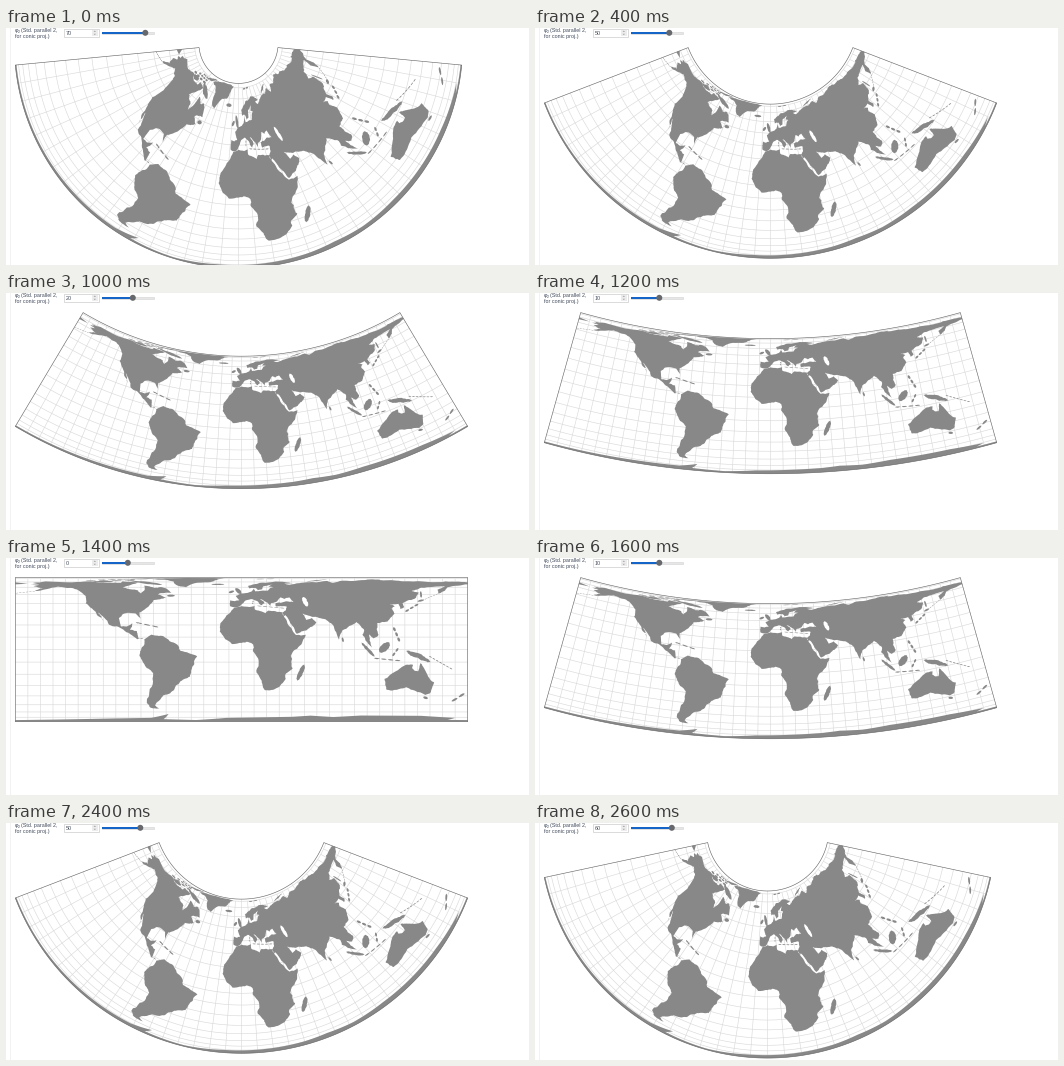
Write a matplotlib script that moves like this. It is 523x237 px and loops after 2800 ms.

```python
import matplotlib.pyplot as plt
import numpy as np
from matplotlib.animation import FuncAnimation
from matplotlib.collections import LineCollection, PolyCollection
from matplotlib.patches import Circle, Polygon, Rectangle

W, H, DPI = 523, 237, 100
PX = 72 / DPI
LAND, GRID, EDGE, TEXT = "#888888", "#d9d9d9", "#666666", "#434c5c"
rng = np.random.default_rng(4)

# Key capes and bays as (longitude, latitude); rough() adds the detail.
north_america = [
    (-168, 65.6), (-162, 66.4), (-166, 68.3), (-156, 71.3), (-128, 70),
    (-108, 68), (-96, 68), (-94.5, 71.5), (-82, 69), (-87, 65), (-94.5, 59),
    (-82.3, 55.2), (-80, 51.3), (-77, 56.5), (-77.5, 62.5), (-69.5, 59),
    (-64.5, 60.3), (-55.8, 52.2), (-66.5, 50), (-60, 46.2), (-70, 43.5),
    (-76, 35), (-81.3, 31), (-80.4, 25.3), (-84, 30), (-94.5, 29.5),
    (-97.6, 26), (-96, 18.9), (-91.5, 18.7), (-87, 21.5), (-88.8, 15.9),
    (-83.3, 15), (-82, 9), (-77.3, 8.5), (-83, 8.3), (-94, 16.1),
    (-105.5, 20.3), (-114, 31), (-109.6, 23.1), (-117.2, 32.8),
    (-124, 40), (-124, 48.2), (-134, 58.5), (-146, 61), (-164.5, 54.6),
    (-158, 58.3), (-165.5, 61.7), (-161, 64.2)]
south_america = [
    (-77.4, 8), (-71.8, 12), (-62, 10.6), (-51.5, 4.2), (-48.5, -1),
    (-35.3, -5.3), (-39, -13.5), (-41, -22), (-48.5, -26), (-54, -34.5),
    (-58, -38), (-62.3, -39.5), (-65.5, -45), (-68.8, -51), (-65.5, -54.8),
    (-72, -54), (-75.3, -48), (-73.5, -38), (-70.3, -19), (-76, -14),
    (-81.2, -5), (-80, -0.5), (-77.3, 4)]
africa = [
    (-6, 35.6), (10.5, 37.2), (10.5, 34), (19, 30.3), (21.5, 32.8),
    (32.4, 31.2), (37.2, 20), (43.3, 11.7), (51.2, 11.9), (47.5, 4),
    (39.2, -5), (40.7, -15), (35, -20), (35, -24.3), (30, -31.2),
    (25, -34), (18.5, -34.2), (14.6, -23), (11.8, -17), (13.6, -12),
    (9, -1), (9.3, 4), (4.3, 6.3), (-7.6, 4.4), (-13.2, 8.7), (-17.3, 14.7),
    (-16.8, 21.5), (-9.8, 30)]
europe = [
    (-9, 37), (-9, 43.2), (-1.6, 43.5), (-4.5, 48.3), (8, 53.7),
    (9.5, 57.5), (10.8, 54), (21, 55), (23, 59), (29.5, 60), (21.5, 61),
    (25, 65.2), (17.3, 61.5), (16.5, 57), (13, 55.5), (11, 59), (6, 58.3),
    (5, 62), (14.5, 68), (27, 71), (41, 67), (34, 66.4), (38, 64.2),
    (44, 67), (60, 69)]
north_asia = [
    (68, 72.5), (72.5, 68), (80.5, 73.2), (104, 77.5), (113, 74),
    (129, 71.5), (160, 69.7), (180, 69), (180, 65), (164, 60), (162, 55),
    (156.7, 51), (156, 56.5), (162, 61.5), (143, 59.3), (135.5, 54.7),
    (141, 52.5), (139, 46.5), (128, 40)]
east_asia = [
    (129.4, 36), (126.4, 34.5), (125, 39.5), (118, 39), (122, 37),
    (119.5, 35), (121.8, 30), (116, 22.8), (108, 21.6), (109, 12),
    (105, 9), (100.9, 13.4), (104, 1.4), (98.5, 8), (97.3, 16.5),
    (91.5, 22.5), (80.3, 15.5), (77.5, 8), (72.8, 20)]
west_asia = [
    (67, 24.8), (56.5, 27), (48.5, 30), (51.6, 24.3), (56, 26),
    (59.6, 22.3), (52, 15.7), (44, 12.7), (39.1, 21), (34.8, 28.8),
    (34, 27.8), (32.4, 30.8), (35.5, 33.5), (36, 36.6), (27.5, 36.8),
    (27, 40.2), (35, 42), (41.5, 41.5)]
mediterranean = [
    (38, 46.5), (34, 44.7), (31, 46.5), (28.2, 42), (23.5, 40.2),
    (22.8, 36.7), (19.4, 41.5), (13, 45.5), (18.3, 40), (16, 38),
    (9, 44.3), (3.2, 43), (-1.5, 37), (-5.5, 36.1)]
australia = [
    (113.8, -24), (115.5, -34), (124, -33.8), (131, -31.5), (138, -34.8),
    (146.4, -39), (150, -37.3), (153.3, -27), (145.5, -15.5),
    (142.5, -10.8), (140.5, -17.5), (135.7, -15), (136.5, -12.2),
    (130.8, -12.2), (122.3, -17.8)]
greenland = [
    (-72, 78), (-60, 82), (-32, 83.5), (-13, 81.5), (-20, 75), (-25, 69.5),
    (-40, 65), (-44, 60), (-52, 64), (-54, 71), (-61, 76)]
antarctica = [
    (-180, -78.3), (-150, -76.5), (-102, -73), (-72, -71.5), (-58, -63.4),
    (-62, -75), (-36, -78), (-12, -71.5), (40, -69), (55, -66.5), (73, -69.5),
    (95, -66.3), (143, -66.9), (170, -71.5), (164, -77.5), (180, -78.3),
    (180, -90), (-180, -90)]


def rough(points, rounds=3):
    """Close the ring and split its edges with small sideways shifts."""
    p = np.array(points, float)
    for _ in range(rounds):
        edge = np.roll(p, -1, 0) - p
        side = edge[:, ::-1] * (1, -1) * rng.normal(0, .06, (len(p), 1))
        p = np.stack([p, p + edge / 2 + side], 1).reshape(-1, 2)
    return np.clip(p, (-180, -90), (180, 90))


def island(a, b, width):
    """Long blob from a to b, with its half width in degrees."""
    a, b = np.array(a), np.array(b)
    axis = (b - a) / 2
    side = axis[::-1] * (-1, 1) / np.hypot(*axis) * width
    t = np.linspace(0, 2 * np.pi, 10, endpoint=False)[:, None]
    return rough((a + b) / 2 + axis * np.cos(t) + side * np.sin(t), 2)


def chain(a, b, count, width):
    """Row of separate islands from a to b."""
    stops = np.linspace(a, b, count + 1)
    return [island(p + .1 * (q - p), q - .1 * (q - p), width)
            for p, q in zip(stops[:-1], stops[1:])]


def dense(points, step=2):
    """Insert points so that long edges bend with the projection."""
    p = np.array(points, float)
    parts = [p[:1]]
    for a, b in zip(p[:-1], p[1:]):
        n = max(1, int(np.ceil(np.abs(b - a).max() / step)))
        parts.append(a + (b - a) * np.arange(1, n + 1)[:, None] / n)
    return np.vstack(parts)


def ring(points):
    return dense([*points, points[0]])


eurasia = europe + north_asia + east_asia + west_asia + mediterranean
shapes = [rough(p) for p in (north_america, south_america, africa, eurasia,
                             australia, greenland)]
shapes += [
    antarctica,
    [(-180, 69), (-170, 66.1), (-180, 65)],
    island((-63, 64), (-89, 73), 2),            # Baffin
    island((-90, 77), (-63, 82.7), 1.4),        # Ellesmere
    island((-118, 71), (-102, 70.8), 1.9),      # Victoria
    island((-59.3, 48.4), (-53, 48.6), 1.3),    # Newfoundland
    island((-24, 65), (-13.7, 65), 1.3),        # Iceland
    island((-.5, 50.5), (-4.5, 58.7), 1.8),     # Britain
    island((-10, 52), (-6, 54.8), 1.4),         # Ireland
    island((52, 70.8), (68, 76.8), .9),         # Novaya Zemlya
    island((44.2, -25.5), (50, -12), 1.9),      # Madagascar
    island((80.2, 9.7), (81, 6), .8),           # Sri Lanka
    island((95.3, 5.6), (106, -5.7), 1.3),      # Sumatra
    island((109.8, -2), (117.8, 5.5), 3),       # Borneo
    island((131, -1), (150.5, -10), 2),         # New Guinea
    island((144.7, -41), (148.2, -43), 1.3),    # Tasmania
    *chain((130, 31.5), (141, 39.5), 3, .9),    # Japan
    island((140, 42), (145.4, 43.8), 1),
    island((143, 46), (142.6, 54.2), .8),       # Sakhalin
    *chain((145.5, 44), (156.5, 51), 5, .25),   # Kurils
    *chain((120.8, 18.5), (126, 6), 3, 1),      # Philippines
    *chain((119.9, -5.5), (125, 1.5), 2, .8),   # Sulawesi
    *chain((105, -6.8), (127, -9), 4, .5),      # Java to Timor
    *chain((149, -5), (168, -16), 7, .35),      # Melanesia
    *chain((166.7, -46.5), (178, -37), 2, 1),   # New Zealand
    *chain((-84.8, 22.3), (-65.5, 18), 3, .5),  # Antilles
    *chain((8.8, 39), (9.3, 43), 2, .4),
    *chain((12, 37.5), (34.5, 35), 5, .3),
    *chain((11, 78.3), (27, 79.5), 2, 1),       # Svalbard
    *chain((-180, 51.5), (-164, 54.3), 6, .25)]
for lat in (73, 75.5, 78):
    shapes += chain((-125 + 4 * (lat - 73), lat), (-84, lat), 4, .9)
land = [ring(p) for p in shapes]
lake = ring(island((49, 47), (52.3, 36.7), 2))
sphere = ring([(-180, 90), (180, 90), (180, -90), (-180, -90)])
grid = [dense([(-180, lat), (180, lat)]) for lat in range(-80, 90, 10)]
for lon in range(-170, 180, 10):
    end = 90 if lon % 90 == 0 else 80
    grid.append(dense([(lon, -end), (lon, end)]))


def albers(points, phi):
    """Equal-area cone with standard parallels 0 and phi."""
    lam, lat = np.radians(points).T
    n = np.sin(np.radians(phi)) / 2
    if n == 0:
        return np.column_stack([lam, -np.sin(lat)])
    rho = np.sqrt(np.maximum(0, 1 - 2 * n * np.sin(lat))) / n
    return np.column_stack([rho * np.sin(n * lam), rho * np.cos(n * lam)])


def fitted(phi):
    """Projection scaled to the page, narrower when a scrollbar shows."""
    edge = albers(sphere, phi)
    low, high = edge.min(0), edge.max(0)
    scale = (446.4 if phi >= 60 else 452.4) / (high[0] - low[0])
    return lambda p: (albers(p, phi) - low) * scale + (9.3, 19.6)


fig = plt.figure(figsize=(W / DPI, H / DPI), dpi=DPI, facecolor="white")
ax = fig.add_axes([0, 0, 1, 1])
ax.set(xlim=(0, W), ylim=(H, 0))
ax.axis("off")

ax.plot([3.5, 3.5], [0, H], color="#f2f2f2", lw=PX)
mesh = LineCollection([], colors=GRID, linewidths=.6 * PX, zorder=1)
soil = PolyCollection([], facecolors=LAND, edgecolors="none", zorder=2)
water = PolyCollection([], facecolors="white", edgecolors="none", zorder=3)
for part in (mesh, soil, water):
    part.set_snap(False)
    ax.add_collection(part, autolim=False)
rim = Polygon([(0, 0), (1, 1)], fill=False, ec=EDGE, lw=.6 * PX, zorder=4,
              snap=False)
ax.add_patch(rim)


def label(x, y, s, size=5.35):
    return ax.text(x, y, s, fontsize=size * PX, color=TEXT,
                   family="Liberation Sans", va="baseline")


label(9, 4, "φ")
label(11.9, 4.8, "2", 3.6)
label(15.2, 4, "(Std. parallel 2,")
label(9, 10.4, "for conic proj.)")

ax.add_patch(Rectangle((58, .5), 35, 8.5, fc="white", ec="#cccccc",
                       lw=.7 * PX))
ax.add_patch(Rectangle((86, 1.5), 5.5, 6.5, fc="#ececec", ec="none"))
for y, d in ((3.8, -1.2), (5.8, 1.2)):
    ax.add_patch(Polygon([(87.6, y), (90, y), (88.8, y + d)], fc="#999999"))
value = label(60, 6.7, "")

ax.add_patch(Rectangle((96, 3.8), 52, 2, fc="#e6e6e6", ec="#d0d0d0",
                       lw=.5 * PX))
filled = Rectangle((96, 3.5), 0, 2.5, fc="#1565c8", ec="none", zorder=3)
thumb = Circle((122, 4.8), 3, fc="#66686c", ec="none", zorder=4)
ax.add_patch(filled)
ax.add_patch(thumb)


def draw(i):
    phi = 10 * abs(7 - i)
    place = fitted(phi)
    mesh.set_segments([place(p) for p in grid])
    soil.set_verts([place(p) for p in land])
    water.set_verts([place(lake)])
    rim.set_xy(place(sphere))
    value.set_text(str(phi))
    x = 121.8 + .25 * phi
    thumb.center = x, 4.8
    filled.set_width(x - 96)
    return mesh, soil, water, rim, value, thumb, filled


anim = FuncAnimation(fig, draw, frames=14, interval=200, repeat=True,
                     repeat_delay=0, init_func=lambda: draw(0))
plt.show()
```
